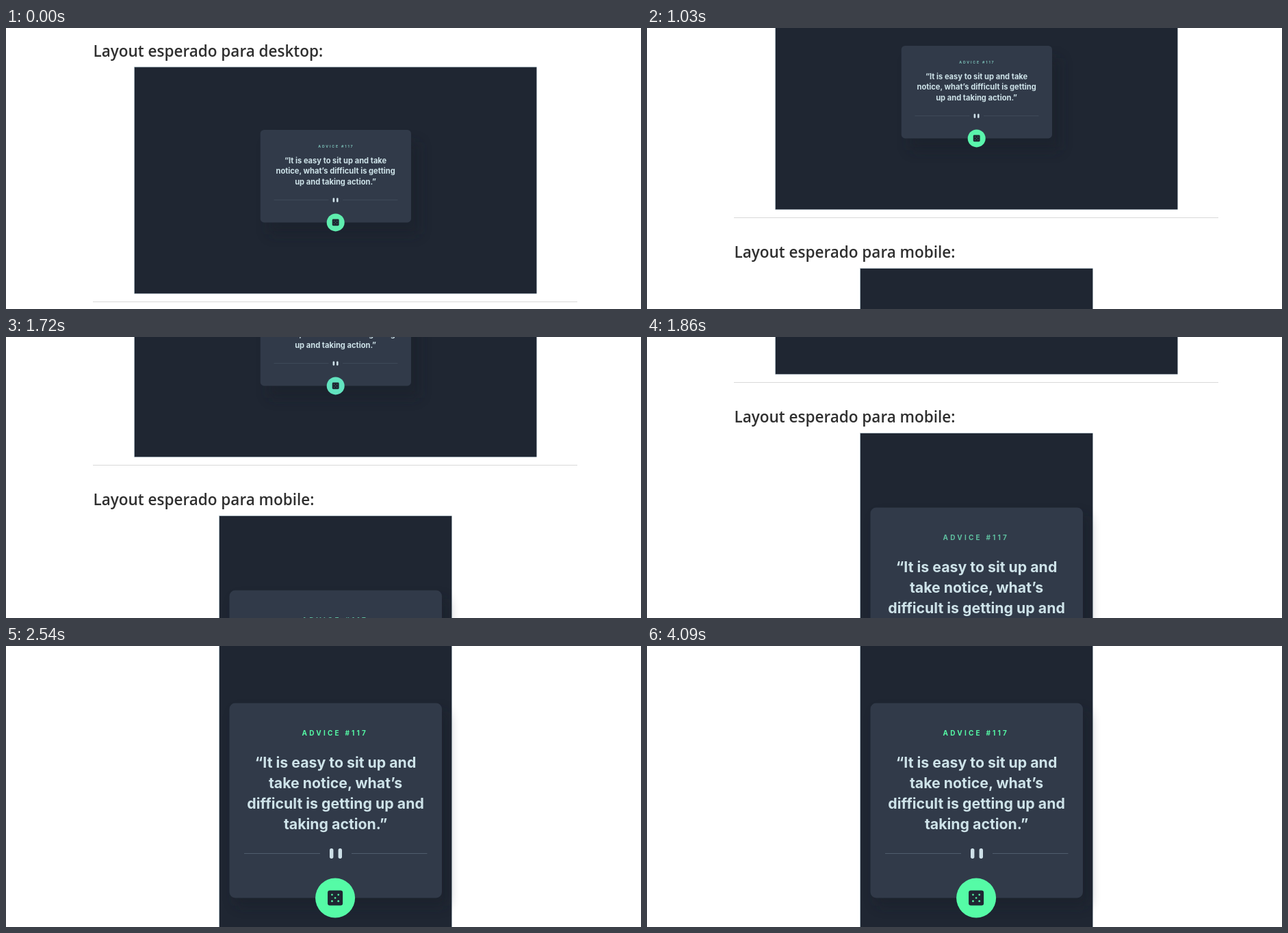
Recreate the animation shown at these times as an HTML page. Size 928 by 411 pixels, loop 5.08 s.

```html
<!DOCTYPE html>
<html lang="pt">
<head>
<meta charset="utf-8">
<title>Layout esperado</title>
<style>
  html, body { margin: 0; width: 100%; height: 100%; overflow: hidden; background: #fff; }
  svg { display: block; position: absolute; left: 0; top: 0; }
  text { font-optical-sizing: none; }
  .heading { font: 600 22.5px "Open Sans", "Noto Sans", sans-serif; fill: #2f2f2f; }
  .quote, .label { font-family: Inter, "Open Sans", sans-serif; font-weight: 700; }
  .quote { fill: #cee3e9; text-anchor: middle; }
  .edge { fill: #92a3ae; }
  .screen, .die { fill: #1f2632; }
  .card { fill: #313a49; }
  .bar { fill: #cee0e8; }
</style>
</head>
<body>
<svg id="stage" width="928" height="411" viewBox="0 0 928 411">
  <defs>
    <filter id="soft" x="-30%" y="-30%" width="160%" height="160%"><feGaussianBlur stdDeviation="9"/></filter>
  </defs>
  <g id="page"></g>
</svg>
<script>
const LOOP = 5080;
const page = document.getElementById("page");

// time, scroll offset, desktop button colour, mobile label colour
const steps = [
  [0, 0, "#5fedae", "#5fc0a0"],
  [690, 13, "#5fedae", "#5fc0a0"],
  [760, 58, "#61e5b0", "#5fc0a0"],
  [830, 94, "#5fedae", "#5fc0a0"],
  [900, 100, "#5af5ac", "#5fc0a0"],
  [1030, 123, "#5af5ac", "#5fc0a0"],
  [1100, 177, "#5fedae", "#5fc0a0"],
  [1170, 200, "#62e3bf", "#5fc0a0"],
  [1720, 213, "#62e3bf", "#5fc0a0"],
  [1790, 264, "#62e3bf", "#5fc0a0"],
  [1860, 334, "#62e3bf", "#5fc0a0"],
  [1920, 386, "#62e3bf", "#5fc0a0"],
  [1990, 400, "#62e3bf", "#5fc0a0"],
  [2400, 432, "#62e3bf", "#5fc0a0"],
  [2470, 485, "#62e3bf", "#5cdca4"],
  [2540, 500, "#62e3bf", "#55fba6"]
];

function add(tag, attrs, text) {
  const el = document.createElementNS("http://www.w3.org/2000/svg", tag);
  for (const key in attrs) el.setAttribute(key, attrs[key]);
  if (text) el.textContent = text;
  page.appendChild(el);
  return el;
}

function rect(x, y, width, height, attrs) {
  return add("rect", { x, y, width, height, ...attrs });
}

function heading(y, text) {
  add("text", { x: 127.5, y, class: "heading" }, text);
}

function screen(x, y, w, h) {
  rect(x - 0.8, y - 0.7, w + 1.1, h + 1.2, { class: "edge" });
  rect(x, y, w, h, { class: "screen" });
}

function advice(o) {
  const [x, y, w, h, rx] = o.card;
  rect(x + o.shadow, y + o.shadow * 1.5, w, h, { rx, fill: "#171d28", opacity: 0.4, filter: "url(#soft)" });
  rect(x, y, w, h, { rx, class: "card" });

  const [lx, ly, size, gap] = o.label;
  const label = add("text", {
    x: lx, y: ly, class: "label", "font-size": size, "letter-spacing": gap, fill: "#7cc0b8"
  }, "ADVICE #117");

  o.lines.forEach((line, i) => add("text", {
    x: 481.6, y: o.base + i * o.leading, class: "quote", "font-size": o.size
  }, line));

  for (const [from, to] of o.rules) rect(from, o.ruleY, to - from, 1, { fill: o.ruleColor });
  const [bx1, bx2, by, bw, bh] = o.bars;
  for (const bx of [bx1, bx2]) rect(bx, by, bw, bh, { rx: bw / 2, class: "bar" });

  const [cx, cy, r] = o.button;
  const d = r * 0.76;
  const green = [add("circle", { cx, cy, r, fill: "#55fba6" })];
  rect(cx - d / 2, cy - d / 2, d, d, { rx: d * 0.15, class: "die" });
  for (const [i, j] of [[0, 0], [-1, -1], [1, -1], [-1, 1], [1, 1]]) {
    green.push(add("circle", {
      cx: cx + i * d * 0.21, cy: cy + j * d * 0.21, r: d * 0.06, fill: "#55fba6", opacity: o.pips
    }));
  }
  return { label, green };
}

heading(42.2, "Layout esperado para desktop:");
screen(188, 57.5, 587.3, 330.7);
const desktop = advice({
  card: [371.7, 149, 220.3, 135.4, 5.5], shadow: 12,
  label: [456.2, 174.6, 5.2, 1.85],
  lines: ["“It is easy to sit up and take", "notice, what’s difficult is getting", "up and taking action.”"],
  base: 197.8, leading: 15.6, size: 11.15,
  rules: [[391.5, 471.5], [492, 572.5]], ruleY: 251, ruleColor: "#3e4958",
  bars: [477.6, 483, 248.4, 2.6, 6.4],
  button: [481.7, 284.4, 13], pips: 0.5
});

rect(127, 400, 708, 1, { fill: "#d9d9d9" });

heading(459.2, "Layout esperado para mobile:");
screen(312, 475, 339.3, 440);
const mobile = advice({
  card: [326.5, 583.4, 310.5, 285.2, 8.5], shadow: 8,
  label: [432.6, 631.1, 10, 3.2],
  lines: ["“It is easy to sit up and", "take notice, what’s", "difficult is getting up and", "taking action.”"],
  base: 678.3, leading: 29.9, size: 21.3,
  rules: [[348, 459], [505, 615.5]], ruleY: 803, ruleColor: "#4f5d6d",
  bars: [473, 485.6, 796, 5.4, 15],
  button: [481.1, 868.5, 29], pips: 1
});

function draw() {
  const t = performance.now() % LOOP;
  let now = steps[0];
  for (const step of steps) if (step[0] <= t) now = step;
  const [, y, button, label] = now;
  page.setAttribute("transform", `translate(0 ${-y})`);
  for (const el of desktop.green) el.setAttribute("fill", button);
  mobile.label.setAttribute("fill", label);
  requestAnimationFrame(draw);
}
draw();
</script>
</body>
</html>
```
